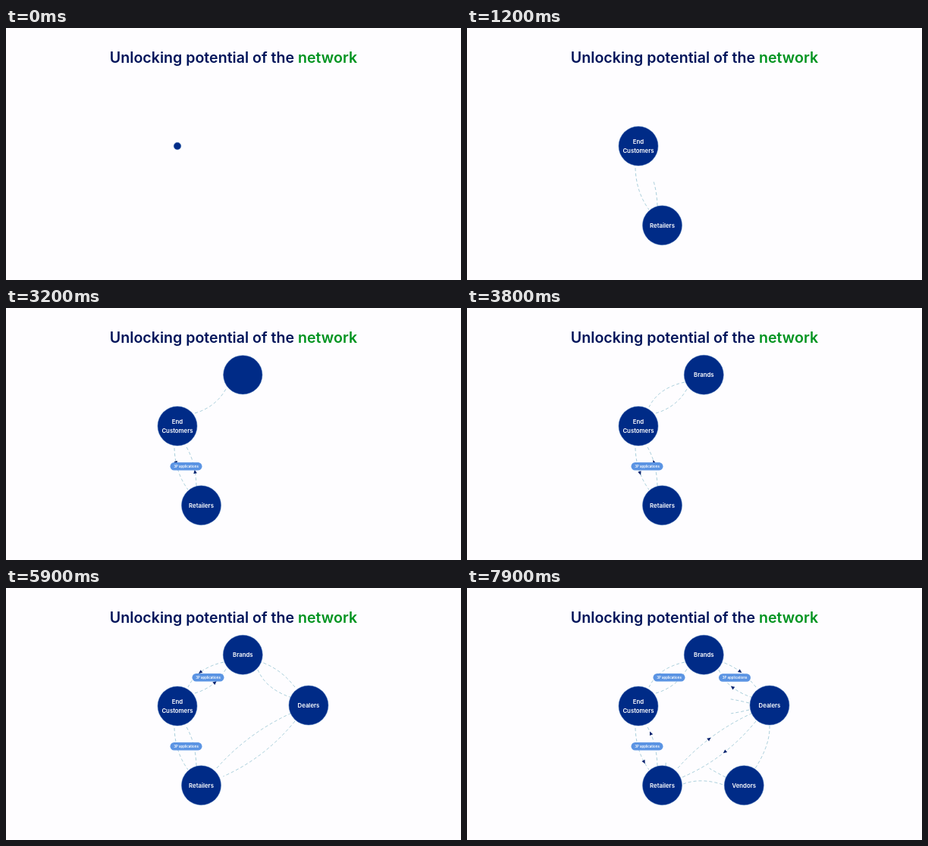
An HTML page for the animation above (8 s loop, 600 by 333 pixels).

```html
<!DOCTYPE html>
<html lang="en">
<head>
<meta charset="utf-8">
<title>Unlocking potential of the network</title>
<style>
  html, body { margin: 0; width: 100%; height: 100%; overflow: hidden; background: #fefdff; }
  svg { display: block; width: 100%; height: 100%; }
  text { font-family: Inter, "Open Sans", sans-serif; font-weight: 600; text-anchor: middle; }
  .title { font-size: 19.6px; fill: #00145a; }
  .title tspan { fill: #009420; }
  .line { fill: none; stroke: #9fc8d6; stroke-width: .9; }
  .arrow { fill: #08246f; }
  .pill rect { fill: #5b94e3; }
  .pill text { font-size: 4.4px; fill: #fff; }
  .node circle { fill: #002b87; stroke: #3d6fb5; stroke-width: .5; }
  .node text { font-size: 7.8px; fill: #fff; }
</style>
</head>
<body>
<svg viewBox="0 0 600 333">
  <text class="title" x="300" y="46">Unlocking potential of the <tspan>network</tspan></text>
  <g id="lines"></g>
  <g id="arrows"></g>
  <g id="pills"></g>
  <g id="nodes"></g>
</svg>
<script>
const LOOP = 8000, STEP = 100;
const ARROW_PERIOD = 3550, ARROW_RATE = 0.4 / 1000;

const clamp = v => Math.min(1, Math.max(0, v));
const ramp = (t, start, length) => clamp((t - start) / length);
const easeOut = p => 1 - (1 - p) ** 2;
const backOut = p => 1 + 1.9 * (p - 1) ** 3 + 0.9 * (p - 1) ** 2;

function add(parent, tag, attrs = {}, text = "") {
  const el = document.createElementNS("http://www.w3.org/2000/svg", tag);
  for (const key in attrs) el.setAttribute(key, attrs[key]);
  el.textContent = text;
  parent.append(el);
  return el;
}
const layer = id => document.getElementById(id);

// start, length: growth of the line; arrow: time its arrow sets off;
// inset: part of the line's end lying under a circle
const lines = [
  { d: "M222 185Q223 217 240 240", start: 480, length: 400, arrow: 2370 },
  { d: "M251 235Q250 203.5 237 182", start: 1020, length: 480, ease: true, arrow: 2370 },
  { d: "M249 139Q276.5 131 290 107", start: 2640, length: 440, arrow: 4490 },
  { d: "M287 98Q252.5 105.5 240 131", start: 3230, length: 450, ease: true, arrow: 4490 },
  { d: "M332 108Q344 136.5 384 147", start: 4500, length: 650, arrow: 6730, inset: 11, reverse: true },
  { d: "M278 238Q322 188 386 161", start: 4450, length: 680, arrow: 6730, inset: 13 },
  { d: "M381 131Q363 107.5 337 98", start: 5430, length: 450, ease: true, arrow: 6730, reverse: true },
  { d: "M381 176Q340 226 284 250", start: 5430, length: 550, ease: true, arrow: 6730 },
  { d: "M399 182Q400 212 372 250", start: 6820, length: 430 },
  { d: "M285 259Q312 249 346 263", start: 6820, length: 430 },
  { d: "M372 152Q310 136 250 150", start: 7800, length: 500 },
  { d: "M372 161Q312 176 252 162", start: 7800, length: 500 },
  { d: "M341 250Q285 222 246 176", start: 7800, length: 500 },
  { d: "M262 235Q265 160 300 113", start: 7840, length: 1200 }
];
for (const line of lines) {
  line.path = add(layer("lines"), "path", { d: line.d, class: "line" });
  line.total = line.path.getTotalLength();
  if (line.arrow) line.head = add(layer("arrows"), "path", { d: "M3 0L-2 2.3V-2.3Z", class: "arrow" });
}

const pills = [[237.5, 209.3, 1780], [266.5, 118.2, 3980], [353, 118.5, 6180]].map(([x, y, start]) => {
  const el = add(layer("pills"), "g", { class: "pill" });
  add(el, "rect", { x: x - 21, y: y - 5.2, width: 42, height: 10.4, rx: 5.2 });
  add(el, "text", { x, y: y + 1.6 }, "3P applications");
  return { el, start };
});

const nodes = [
  [226, 156, -15, "End", "Customers"],
  [257.5, 260.8, 850, "Retailers"],
  [312.3, 88.3, 3050, "Brands"],
  [399, 155, 5220, "Dealers"],
  [365.3, 260.8, 7260, "Vendors"]
].map(([x, y, start, ...words]) => {
  const el = add(layer("nodes"), "g", { class: "node" });
  const circle = add(el, "circle", { cx: x, cy: y });
  const label = add(el, "g");
  words.forEach((word, i) =>
    add(label, "text", { x, y: y + 2.8 + 12 * (i - (words.length - 1) / 2) }, word));
  return { circle, label, start };
});

function growLine(line, t) {
  const p = ramp(t, line.start, line.length);
  const shown = line.total * (line.ease ? easeOut(p) : p);
  const dashes = [];
  for (let at = 0; at < shown; at += 7) {
    const dash = Math.min(4, shown - at);
    dashes.push(dash, at + 7 < shown ? 3 : 999);
  }
  line.path.style.strokeDasharray = dashes.join(" ");
  line.path.style.visibility = p > 0 ? "visible" : "hidden";
}

// Past the line's end the arrow runs straight on beneath the circle.
function moveArrow(line, t) {
  const { path, total, head, reverse, inset = 0 } = line;
  const since = t - line.arrow;
  head.style.visibility = since > -60 ? "visible" : "hidden";
  const u = (Math.max(0, since) % ARROW_PERIOD) * ARROW_RATE;
  const run = u * (total - inset);
  const at = reverse ? total - inset - run : run;
  const base = Math.min(total, Math.max(0, at));
  const a = path.getPointAtLength(Math.max(0, base - 1));
  const b = path.getPointAtLength(Math.min(total, base + 1));
  const angle = Math.atan2(b.y - a.y, b.x - a.x);
  const p = path.getPointAtLength(base), extra = at - base;
  const x = p.x + extra * Math.cos(angle), y = p.y + extra * Math.sin(angle);
  const turn = angle * 180 / Math.PI + (reverse ? 180 : 0);
  head.setAttribute("transform", `translate(${x} ${y}) rotate(${turn})`);
}

function draw(t) {
  for (const line of lines) {
    growLine(line, t);
    if (line.head) moveArrow(line, t);
  }
  for (const { el, start } of pills) el.style.opacity = ramp(t, start, 300);
  for (const { circle, label, start } of nodes) {
    const p = ramp(t, start, 300);
    circle.setAttribute("r", p > 0 ? Math.max(3.5, 26 * backOut(p)) : 0);
    label.style.opacity = ramp(t, start + 150, 200);
  }
}

const origin = performance.now();
function tick() {
  const t = (performance.now() - origin) % LOOP;
  draw(Math.floor(t / STEP) * STEP);
  requestAnimationFrame(tick);
}
tick();
</script>
</body>
</html>
```
